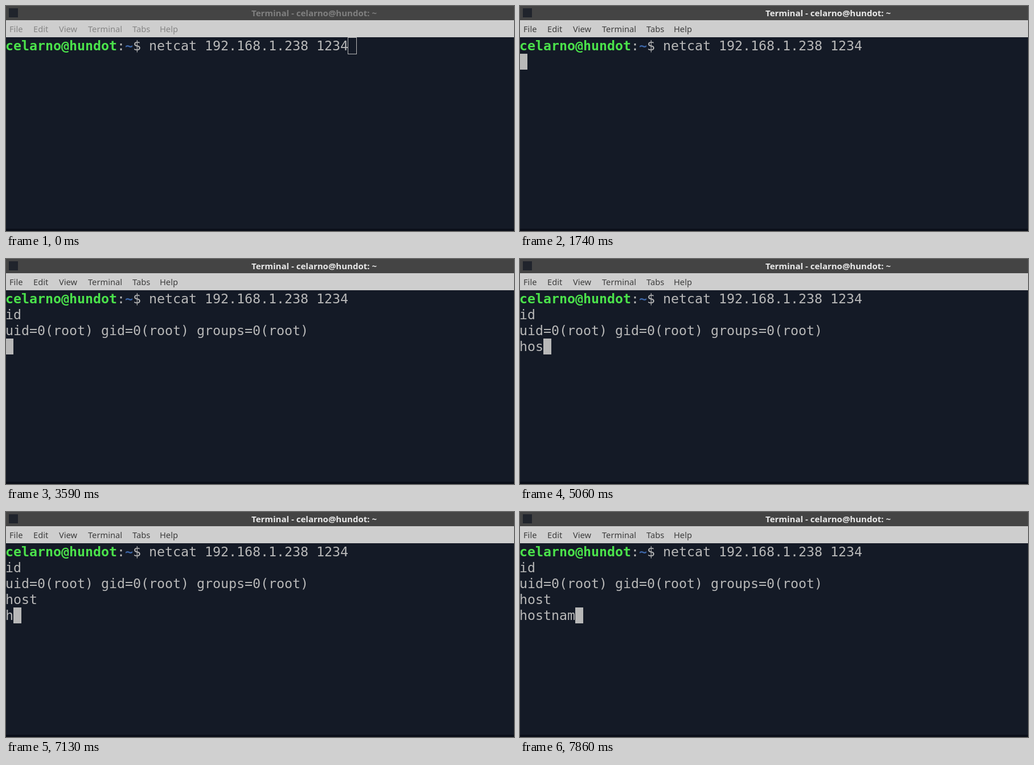
Animation, 892 px wide and 396 px high, one loop 7.99 s. Source, as an HTML page with a canvas:

```html
<!DOCTYPE html>
<html lang="en">
<head>
<meta charset="utf-8">
<title>Terminal</title>
<style>
  html, body { margin: 0; width: 100%; height: 100%; overflow: hidden; background: #141a26; }
  canvas { display: block; }
</style>
</head>
<body>
<canvas id="stage" width="892" height="396"></canvas>
<script>
const ctx = document.getElementById('stage').getContext('2d');
const LOOP = 7990, TITLE_FOCUS = 610, FOCUS = 670;
const CELL = 14, LINE = 28, LEFT = -1, TOP = 56, ASCENT = 22;
const INK = '#b8b8b8';
const USER = 'celarno@hundot';
const MONO = '23.25px "DejaVu Sans Mono", monospace';
const UI = '"Noto Sans", sans-serif';

const MENU = [['File', 6], ['Edit', 48], ['View', 93], ['Terminal', 144], ['Tabs', 222], ['Help', 270]];

// What the terminal prints, and when
const OUTPUT = [
  [0, USER + ':~$ netcat 192.168.1.238 1234'],
  [1740, '\n'],
  [3070, 'i'], [3200, 'd'],
  [3590, '\nuid=0(root) gid=0(root) groups=0(root)\n'],
  [4800, 'h'], [4930, 'o'], [5060, 's'], [5270, 't'],
  [5460, '    '], [5790, '\n'],
  [7130, 'h'], [7260, 'o'], [7350, 's'], [7480, 't'], [7590, 'n'],
  [7790, 'a'], [7860, 'm']
];

function rect(x, y, w, h, color) {
  ctx.fillStyle = color;
  ctx.fillRect(x, y, w, h);
}

function text(str, x, y, font, color) {
  ctx.font = font;
  ctx.fillStyle = color;
  ctx.fillText(str, x, y);
}

const cellX = col => LEFT + col * CELL;

function drawWindow(t) {
  rect(0, 0, 892, 25, '#444444');
  rect(0, 25, 892, 30, '#cecece');
  rect(0, 55, 892, 337, '#141a26');
  rect(0, 392, 892, 4, '#0b0f19');
  rect(5, 4, 16, 16, '#20242c');
  text(`Terminal - ${USER}: ~`, 431, 18, `bold 15px ${UI}`, t < TITLE_FOCUS ? '#808080' : '#eaeaea');
  for (const [label, x] of MENU)
    text(label, x, 46, `14.667px ${UI}`, t < FOCUS ? '#858585' : '#3c3c3c');
}

function drawPrompt(line) {
  const y = TOP + ASCENT, host = USER.length;
  text(USER, LEFT, y, 'bold ' + MONO, '#4be24b');
  text(':', cellX(host), y, MONO, INK);
  text('~', cellX(host + 1), y, 'bold ' + MONO, '#3d66a6');
  text(line.slice(host + 2), cellX(host + 2), y, MONO, INK);
}

function drawCursor(col, row, focused) {
  const x = cellX(col), y = TOP + row * LINE;
  if (focused) return rect(x, y, CELL, LINE, INK);
  ctx.strokeStyle = INK;
  ctx.lineWidth = 1;
  ctx.strokeRect(x - 0.5, y - 0.5, CELL + 1, LINE + 1);
}

function draw(now) {
  const t = now % LOOP;
  const lines = OUTPUT.filter(([at]) => at <= t).map(([, s]) => s).join('').split('\n');
  const last = lines.length - 1;
  drawWindow(t);
  drawPrompt(lines[0]);
  lines.slice(1).forEach((line, i) => text(line, LEFT, TOP + (i + 1) * LINE + ASCENT, MONO, INK));
  drawCursor(lines[last].length, last, t >= FOCUS);
  requestAnimationFrame(draw);
}

const start = performance.now();
const frame = draw;
draw = () => frame(Math.max(0, performance.now() - start));
draw();
</script>
</body>
</html>
```
